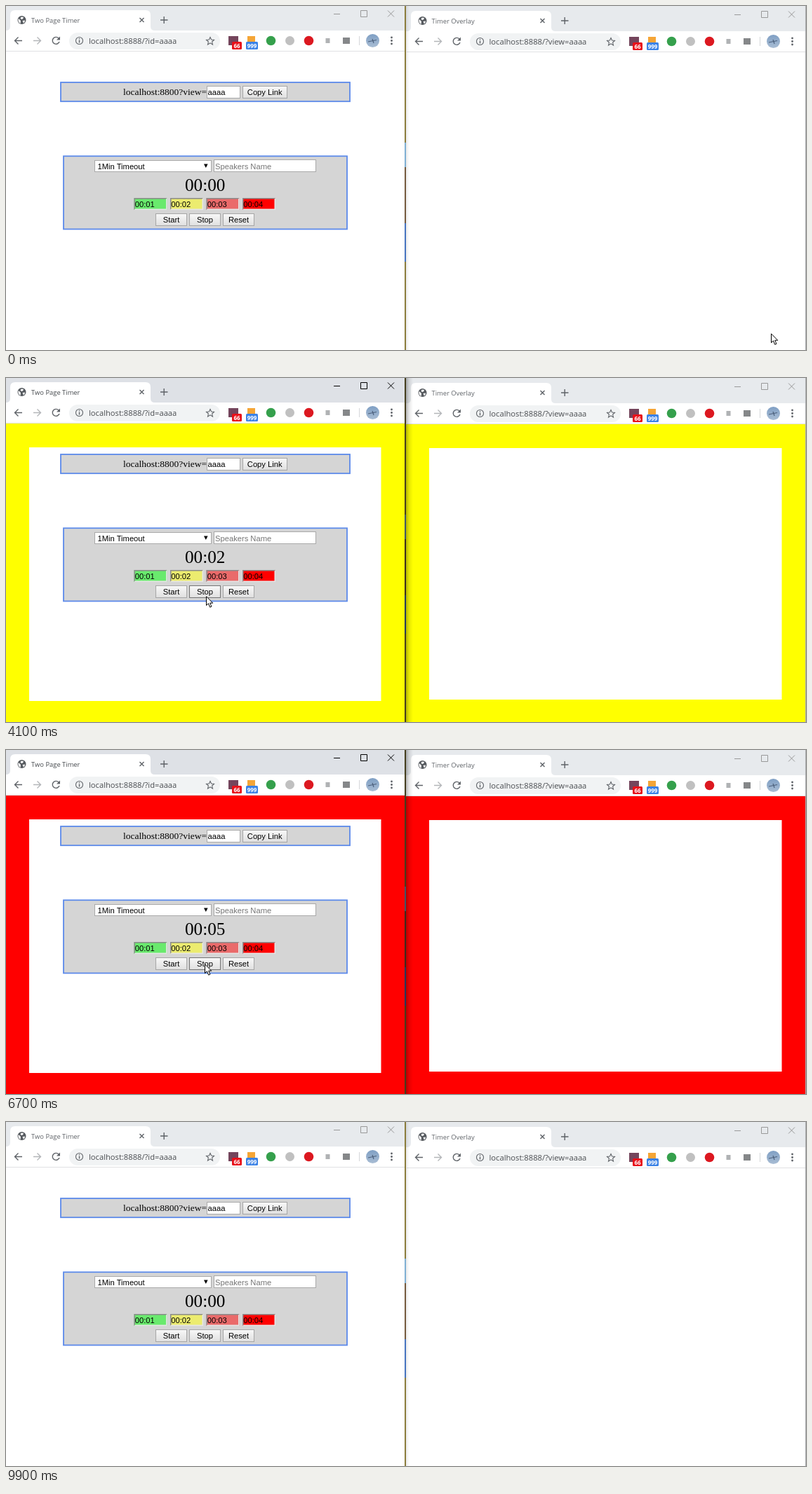
Write an HTML page that moves like this. It is 1140 px wide and 491 px high and loops after 10000 ms.

```html
<!DOCTYPE html>
<html lang="en">
<head>
<meta charset="utf-8">
<title>Two Page Timer</title>
<style>
  html, body { margin: 0; width: 100%; height: 100%; overflow: hidden; background: #fff; }
  svg { display: block; width: 100vw; height: 100vh; }

  .ui { font-family: "Open Sans", "Noto Sans", sans-serif; font-size: 11.2px; fill: #4a4d51; }
  .title { font-size: 9.4px; fill: #5f6368; }
  .badge { font: bold 8px "Open Sans", sans-serif; fill: #fff; text-anchor: middle; }
  .form { font-family: "Liberation Sans", Arial, sans-serif; font-size: 11.2px; }
  .serif { font-family: "Liberation Serif", "Times New Roman", serif; font-size: 13.47px; }
  .clock { font-size: 25.2px; }
  .mid { text-anchor: middle; }
  .line { fill: none; stroke: #5f6368; stroke-width: 1.4; }
  .panel { fill: #d5d5d5; stroke: #5c8aea; stroke-width: 1.8; }
  .field { fill: #fff; stroke: #a9a9a9; }
  .btn { fill: url(#face); stroke: #a6a6a6; }

  /* 1% of the loop is 100 ms */
  .alert, .active, .strip, .tabname, .controls, .digits, .pointer, .start, .stop, .reset {
    animation: 10s step-end infinite;
  }
  .alert { animation-name: alert; }
  .active { animation-name: active; }
  .strip { animation-name: strip; }
  .tabname { animation-name: tabname; }
  .controls { animation-name: controls; }
  .digits { animation-name: count; }
  .pointer { animation-name: pointer; }
  .start { animation-name: start; }
  .stop { animation-name: stop; }
  .reset { animation-name: reset; }

  @keyframes alert {
    0%, 62%, 72%, 91%, 100% { fill: #fff; }
    27% { fill: #008000; }
    37% { fill: #ff0; }
    47%, 67%, 77% { fill: #f00; }
  }
  @keyframes active { 0%, 99%, 100% { opacity: 0; } 16% { opacity: 1; } }
  @keyframes strip { 0%, 99%, 100% { fill: #e7eaed; } 16% { fill: #dee1e6; } }
  @keyframes tabname { 0%, 99%, 100% { fill: #5f6368; } 16% { fill: #45494d; } }
  @keyframes controls { 0%, 99%, 100% { color: #999; } 16% { color: #000; } }
  @keyframes count {
    0%, 91%, 100% { transform: translateY(0); }
    22% { transform: translateY(-40px); }
    32% { transform: translateY(-80px); }
    42% { transform: translateY(-120px); }
    52% { transform: translateY(-160px); }
    62% { transform: translateY(-200px); }
    72% { transform: translateY(-240px); }
  }
  @keyframes start {
    0%, 29%, 100% { stroke: #a6a6a6; }
    11% { stroke: #747474; }
    0%, 17%, 100% { fill: url(#face); }
    16% { fill: url(#down); }
  }
  @keyframes stop {
    0%, 82%, 100% { stroke: #a6a6a6; }
    30% { stroke: #747474; }
    0%, 77%, 100% { fill: url(#face); }
    76% { fill: url(#down); }
  }
  @keyframes reset {
    0%, 93%, 100% { stroke: #a6a6a6; }
    82% { stroke: #747474; }
    0%, 91%, 100% { fill: url(#face); }
    90% { fill: url(#down); }
  }
  @keyframes pointer {
    0%, 100% { transform: translate(1090px, 467px); }
    1% { transform: translate(720px, 392px); }
    2% { transform: translate(364px, 311px); }
    3% { transform: translate(-50px, 0); }
    6% { transform: translate(279px, 318px); }
    7% { transform: translate(250px, 328px); }
    8% { transform: translate(205px, 326px); }
    9% { transform: translate(177px, 320px); }
    10% { transform: translate(190px, 314px); }
    11% { transform: translate(222px, 307px); }
    12% { transform: translate(243px, 302px); }
    23% { transform: translate(242px, 302px); }
    27% { transform: translate(244px, 305px); }
    28% { transform: translate(250px, 309px); }
    29% { transform: translate(257px, 311px); }
    30% { transform: translate(263px, 311px); }
    31% { transform: translate(268px, 309px); }
    32% { transform: translate(271px, 308px); }
    33% { transform: translate(273px, 307px); }
    35% { transform: translate(277px, 307px); }
    37% { transform: translate(280px, 309px); }
    38% { transform: translate(283px, 310px); }
    39% { transform: translate(284px, 310px); }
    41% { transform: translate(285px, 311px); }
    50% { transform: translate(284px, 309px); }
    51% { transform: translate(283px, 308px); }
    60% { transform: translate(283px, 307px); }
    63% { transform: translate(283px, 306px); }
    65% { transform: translate(283px, 305px); }
    80% { transform: translate(290px, 305px); }
    81% { transform: translate(304px, 306px); }
    82% { transform: translate(318px, 306px); }
    83% { transform: translate(326px, 306px); }
    84% { transform: translate(329px, 305px); }
    92% { transform: translate(335px, 312px); }
    93% { transform: translate(350px, 330px); }
    94% { transform: translate(380px, 370px); }
    95% { transform: translate(420px, 430px); }
    96% { transform: translate(-50px, 0); }
  }
</style>
</head>
<body>
<svg viewBox="0 0 1140 491" preserveAspectRatio="none">
  <defs>
    <linearGradient id="face" x2="0" y2="1">
      <stop stop-color="#f8f8f8"/><stop offset="1" stop-color="#e0e0e0"/>
    </linearGradient>
    <linearGradient id="down" x2="0" y2="1">
      <stop stop-color="#d8d8d8"/><stop offset="1" stop-color="#eee"/>
    </linearGradient>
    <linearGradient id="shade">
      <stop stop-color="#000" stop-opacity=".22"/>
      <stop offset=".4" stop-color="#000" stop-opacity=".1"/>
      <stop offset="1" stop-color="#000" stop-opacity="0"/>
    </linearGradient>
    <linearGradient id="sky" x2="0" y2="1">
      <stop stop-color="#7f9fc4"/><stop offset="1" stop-color="#a9bdd4"/>
    </linearGradient>
    <clipPath id="slot"><rect x="298" y="244" width="18" height="26"/></clipPath>

    <!-- tab and toolbar -->
    <g id="bar">
      <path d="M0 35Q6 35 6 29V13Q6 6 13 6H199Q206 6 206 13V29Q206 35 212 35H568V65H0Z" fill="#fff"/>
      <rect y="64" width="568" height="1" fill="#e0e1e3"/>
      <circle cx="22.5" cy="20" r="6" fill="#565a5f"/>
      <path d="M18 18L21 21L20.5 25Q17 23 17.5 19ZM22 15.5L25 16L24 18.5L21.5 19L20.500 17ZM23.5 21L27 20.5Q27 23 25 24.5Z" fill="#fff"/>
      <path class="line" d="M190.5 17L196.5 23M196.5 17L190.5 23M220 20H230.5M225.2 15V25"/>
      <path class="line" d="M23 49.5H12.5M17.5 44.5L12.5 49.5L17.5 54.5"/>
      <path class="line" style="stroke:#b4b6b9" d="M39 49.5H49.5M44.5 44.5L49.5 49.5L44.5 54.5"/>
      <path class="line" d="M75 46A5 5 0 1 0 76 51"/>
      <path d="M77 43.5V48.5H72Z" fill="#5f6368"/>
      <rect x="90" y="38" width="215" height="24" rx="12" fill="#f1f3f4"/>
      <circle class="line" cx="104.5" cy="49.5" r="5" style="stroke-width:1.1"/>
      <path class="line" d="M104.5 48.5V52.5M104.5 46V47.3"/>
      <path class="line" style="stroke-width:1.1" d="M291 44.5L292.6 48L296.5 48.4L293.6 51L294.5 55L291 52.9L287.5 55L288.4 51L285.5 48.4L289.4 48Z"/>

      <rect x="317" y="43" width="14" height="13" fill="#74455c"/>
      <rect x="322" y="51" width="14" height="11" rx="1.5" fill="#e8111b"/>
      <text class="badge" x="329" y="59.5">66</text>
      <rect x="344" y="43" width="11" height="11" fill="#f5a536"/>
      <rect x="342" y="51" width="17" height="11" rx="1.5" fill="#3b82e6"/>
      <text class="badge" x="350.5" y="59.5">999</text>
      <circle cx="377.5" cy="49.5" r="6.8" fill="#35a04c"/>
      <circle cx="404.5" cy="49.5" r="6.5" fill="#c0c0c0"/>
      <circle cx="431.5" cy="49.5" r="6.8" fill="#dc1820"/>
      <rect x="455.5" y="46" width="6" height="7" fill="#b0b2b4"/>
      <rect x="480" y="45" width="10" height="9" fill="#858789"/>
      <rect x="503" y="43" width="1" height="13" fill="#d5d7da"/>
      <circle cx="522.5" cy="49.5" r="9.5" fill="url(#sky)"/>
      <path d="M516 51L528 48.5M522 47L524 53" stroke="#4c607c" stroke-width="1.2"/>
      <g fill="#5f6368">
        <circle cx="549.5" cy="45" r="1.4"/><circle cx="549.5" cy="49.5" r="1.4"/><circle cx="549.5" cy="54" r="1.4"/>
      </g>
      <path d="M467 11.5H476M505.5 6.5H514.5V15.5H505.5ZM544 6.5L553 15.5M553 6.5L544 15.5" fill="none" stroke="currentColor"/>
    </g>

    <!-- inset edge of a coloured time field -->
    <g id="inset">
      <path d="M0 17V0H47L45.5 1.5H1.5V15.5Z" fill="#8b8b8b"/>
      <path d="M0 17H47V0L45.5 1.5V15.5H1.5Z" fill="#e6e6e6"/>
    </g>
  </defs>

  <rect width="1140" height="491" fill="#fff"/>

  <!-- page areas -->
  <g class="alert">
    <rect y="65" width="568" height="426"/>
    <rect x="570" y="66" width="569" height="425"/>
  </g>
  <rect x="33" y="99" width="501.5" height="362" fill="#fff"/>
  <rect x="603" y="100" width="502.5" height="359" fill="#fff"/>

  <!-- right window -->
  <rect x="570" width="570" height="36" fill="#e7eaed"/>
  <g color="#999"><use href="#bar" x="571" y="1"/></g>
  <text class="ui title" x="606.5" y="24.5">Timer Overlay</text>
  <text class="ui" x="688.5" y="54.5">localhost:8888/?view=aaaa</text>
  <rect x="1139" width="1" height="491" fill="#a8aaac"/>
  <rect x="570" width="5" height="491" fill="url(#shade)" opacity=".45"/>
  <rect class="active" x="570" width="10" height="491" fill="url(#shade)"/>

  <!-- gap between the windows -->
  <rect x="568" width="2" height="491" fill="#8b7c3c"/>
  <rect x="568" y="195" width="2" height="35" fill="#7fb0d4"/>
  <rect x="568" y="230" width="2" height="80" fill="#755a3e"/>
  <rect x="568" y="310" width="2" height="55" fill="#4674c0"/>
  <rect class="active" x="568" width="2" height="491" fill="#000" fill-opacity=".5"/>

  <!-- left window -->
  <rect class="strip" width="568" height="36"/>
  <g class="controls"><use href="#bar"/></g>
  <text class="ui title tabname" x="36" y="23.5">Two Page Timer</text>
  <text class="ui" x="118" y="53.5">localhost:8888/?id=aaaa</text>

  <rect class="panel" x="78" y="109" width="412" height="27.2"/>
  <text class="serif" x="167" y="127">localhost:8800?view=</text>
  <rect class="field" x="286.5" y="114.5" width="47" height="17"/>
  <text class="form" x="287.5" y="127">aaaa</text>
  <rect class="btn" x="337.5" y="114.5" width="63" height="17"/>
  <text class="form mid" x="368.7" y="127">Copy Link</text>

  <rect class="panel" x="82" y="214.3" width="404" height="104.2"/>
  <rect class="field" x="126.5" y="220.5" width="166" height="16"/>
  <text class="form" x="130.5" y="232.5">1Min Timeout</text>
  <path d="M282 225.5H287.6L284.8 231Z"/>
  <rect class="field" x="296.5" y="219.5" width="145" height="17"/>
  <text class="form" x="298" y="232.5" style="fill:#757575">Speakers Name</text>

  <text class="serif clock" x="255" y="264">00:0</text>
  <g clip-path="url(#slot)">
    <g class="digits serif clock">
      <text x="299.8" y="264">0</text>
      <text x="299.8" y="304">1</text>
      <text x="299.8" y="344">2</text>
      <text x="299.8" y="384">3</text>
      <text x="299.8" y="424">4</text>
      <text x="299.8" y="464">5</text>
      <text x="299.8" y="504">6</text>
    </g>
  </g>

  <rect x="182.5" y="274" width="47" height="17" fill="#69ea6d"/>
  <rect x="234" y="274" width="47" height="17" fill="#ecec6f"/>
  <rect x="285.5" y="274" width="47" height="17" fill="#ea6a6a"/>
  <rect x="337" y="274" width="47" height="17" fill="#f00"/>
  <use href="#inset" x="182.5" y="274"/>
  <use href="#inset" x="234" y="274"/>
  <use href="#inset" x="285.5" y="274"/>
  <use href="#inset" x="337" y="274"/>
  <g class="form">
    <text x="183.7" y="286.5">00:01</text>
    <text x="235.2" y="286.5">00:02</text>
    <text x="286.7" y="286.5">00:03</text>
    <text x="338.2" y="286.5">00:04</text>
  </g>

  <rect class="btn start" x="213.5" y="296.5" width="44" height="17"/>
  <rect class="btn stop" x="261.5" y="296.5" width="44" height="17"/>
  <rect class="btn reset" x="309.5" y="296.5" width="44" height="17"/>
  <g class="form mid">
    <text x="235.5" y="308.5">Start</text>
    <text x="283.5" y="308.5">Stop</text>
    <text x="331.5" y="308.5">Reset</text>
  </g>

  <path class="pointer" d="M.5 .8V13.6L3.4 10.8L5.7 16.2L7.9 15.2L5.7 10.2H9.7Z" fill="#fff" stroke="#000"/>
</svg>
</body>
</html>
```
